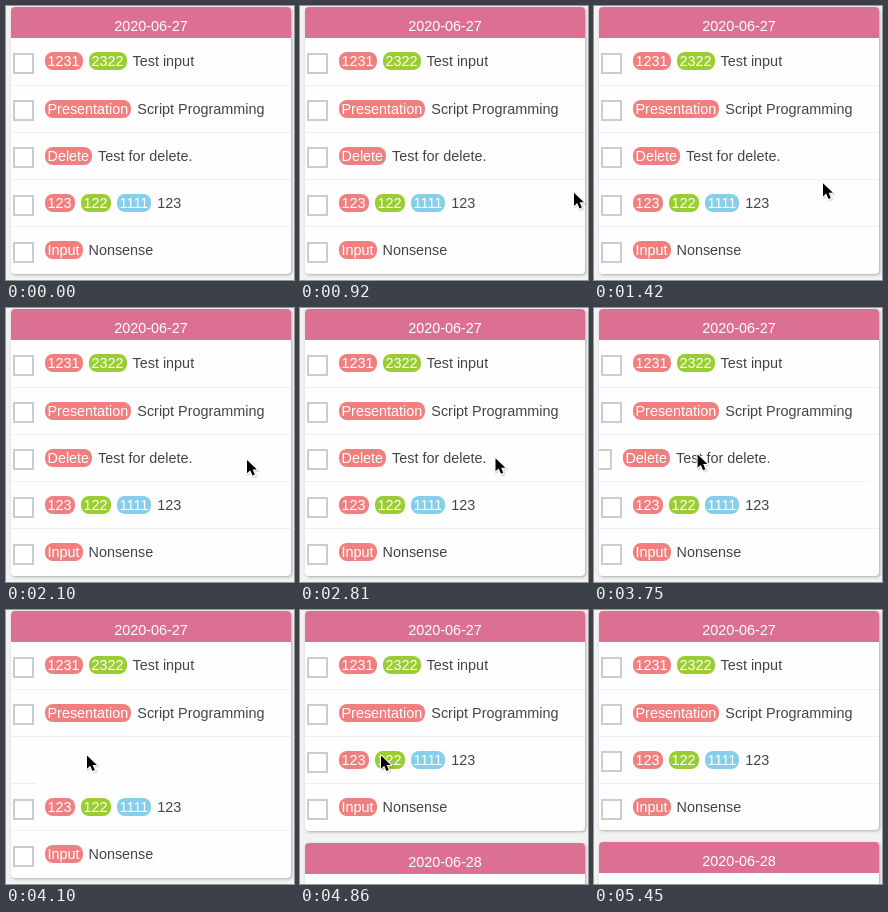
Write an HTML page that moves like this. It is 288 px wide and 274 px high and loops after 6260 ms.

```html
<!DOCTYPE html>
<html lang="en">
<head>
<meta charset="utf-8">
<title>Swipe to delete</title>
<style>
  html, body { margin: 0; width: 100%; height: 100%; overflow: hidden; background: #f2f2f2; }
  #stage { position: relative; width: 288px; height: 274px; overflow: hidden;
    font: 14.4px/16px "Liberation Sans", Arial, sans-serif; color: #444; }
  .card { position: absolute; left: 5px; width: 280px; overflow: hidden;
    border-radius: 4px; background: #fefefe; box-shadow: 1px 1px 3px rgba(0, 0, 0, .3); }
  .head { height: 31px; background: #db7093; color: #fff; text-align: center; }
  .head span { position: relative; top: 11px; }
  .row { position: absolute; left: 0; width: 280px; height: 47.25px; }
  .row::after { content: ""; position: absolute; left: 0; top: 47.25px;
    width: 280px; height: 1px; background: #f0f0f0; }
  .box { position: absolute; left: 2px; top: 15.5px; width: 17px; height: 17px;
    border: 2px solid #ccc; background: #fff; }
  .line { position: absolute; left: 33.5px; top: 16px; white-space: nowrap; }
  .tag { margin-right: 6px; padding: 1px 3px; border-radius: 8px; color: #fff; }
  svg { position: absolute; left: 0; top: 0; }
</style>
</head>
<body>
<div id="stage"></div>
<script>
const LOOP = 6260, PITCH = 47.25, HEAD = 30.35;
const SLIDE = 3719, COLLAPSE = 4330, MOVE = 600;
const SHOW = 800, HIDE = 5450;
const COLORS = ['#f08080', '#9acd32', '#87ceeb'];
const ITEMS = [
  [['1231', '2322'], 'Test input'],
  [['Presentation'], 'Script Programming'],
  [['Delete'], 'Test for delete.'],
  [['123', '122', '1111'], '123'],
  [['Input'], 'Nonsense']
];
const REMOVED = 2;

// pointer moves, each from where the last one ended
const ENTRY = { x: 290, y: 187 };
const MOVES = [
  { from: 800, to: 1210, x: 210, y: 186 },
  { from: 1210, to: 1420, x: 229, y: 177.3 },
  { from: 1450, to: 1980, x: 241, y: 152 },
  { from: 2100, to: 2380, x: 244, y: 150.5 },
  { from: 2620, to: 2920, x: 175.5, y: 150 },
  { from: 3110, to: 4060, x: 81, y: 145.5 },
  { from: 5160, to: 5480, x: 235, y: 288 }
];

const stage = document.getElementById('stage');

function add(parent, cls, text = '', tag = 'div') {
  const el = document.createElement(tag);
  el.className = cls;
  el.textContent = text;
  parent.append(el);
  return el;
}

function makeCard(date) {
  const card = add(stage, 'card');
  add(add(card, 'head'), '', date, 'span');
  return card;
}

function makeRow([tags, text]) {
  const row = add(first, 'row');
  add(row, 'box');
  const line = add(row, 'line');
  tags.forEach((t, i) => {
    add(line, 'tag', t, 'span').style.background = COLORS[i];
  });
  line.append(text);
  return row;
}

const first = makeCard('2020-06-27');
const second = makeCard('2020-06-28');
first.style.top = '1px';
second.style.height = '200px';
const rows = ITEMS.map(makeRow);

stage.insertAdjacentHTML('beforeend', `<svg width="288" height="274">
  <g id="pointer" stroke-linejoin="round">
    <path d="M.6 1V15l3.6-3 2.4 5.2 2.7-1.2-2.2-5h4.3z" stroke="#000" stroke-width="2" opacity=".12"/>
    <path d="M0 0V13.2l3.2-2.9 2.3 5.3 2.3-1-2.2-5.1h4.3z" stroke="#fff" stroke-width="2" paint-order="stroke"/>
  </g></svg>`);
const pointer = document.getElementById('pointer');

const clamp = v => Math.min(1, Math.max(0, v));
const sine = u => (1 - Math.cos(Math.PI * clamp(u))) / 2;

// the CSS "ease" curve, solved by bisection
function ease(t) {
  t = clamp(t);
  let lo = 0, hi = 1;
  for (let i = 0; i < 24; i++) {
    const s = (lo + hi) / 2;
    if (.75 * s * (1 - s) + s ** 3 < t) lo = s; else hi = s;
  }
  return .3 * lo * (1 - lo) ** 2 + 3 * lo * lo * (1 - lo) + lo ** 3;
}

function pointerAt(t) {
  return MOVES.reduce((p, m) => {
    const k = sine((t - m.from) / (m.to - m.from));
    return { x: p.x + (m.x - p.x) * k, y: p.y + (m.y - p.y) * k };
  }, ENTRY);
}

function draw(t) {
  const gap = PITCH * ease((t - COLLAPSE) / MOVE);
  const bottom = HEAD + PITCH * rows.length - gap;
  rows.forEach((row, i) => {
    row.style.top = HEAD + PITCH * i - (i > REMOVED ? gap : 0) + 'px';
  });
  const shift = -280 * ease((t - SLIDE) / MOVE);
  rows[REMOVED].style.transform = shift ? `translateX(${shift}px)` : 'none';
  first.style.height = bottom + 'px';
  second.style.top = bottom + 13 + 'px';

  const { x, y } = pointerAt(t);
  pointer.style.display = t > SHOW && t < HIDE ? '' : 'none';
  pointer.setAttribute('transform', `translate(${x} ${y})`);
}

const start = performance.now();
function tick() {
  draw((performance.now() - start) % LOOP);
  requestAnimationFrame(tick);
}
tick();
</script>
</body>
</html>
```
